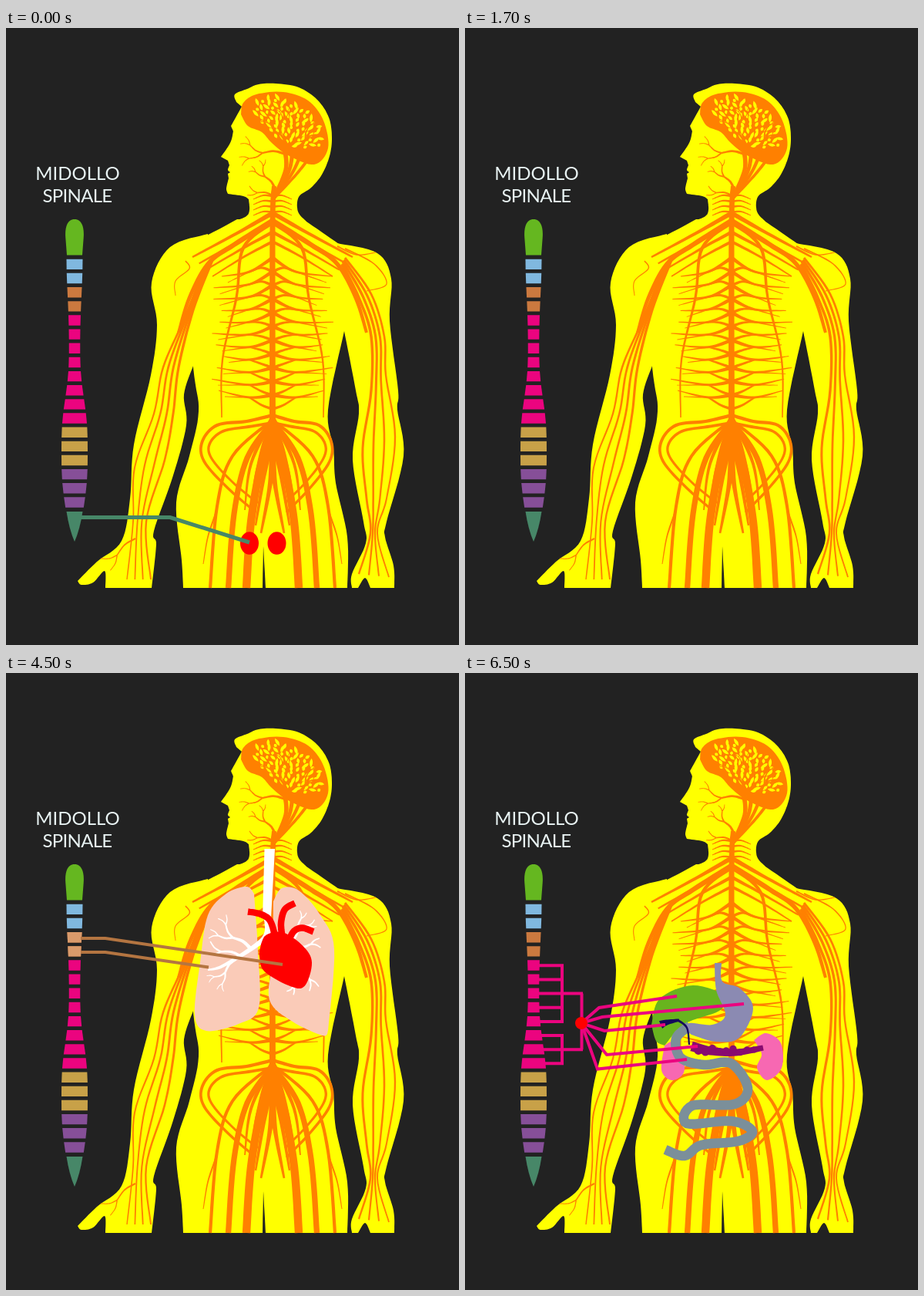
Write an HTML page that moves like this. It is 588 by 800 pixels and loops after 8000 ms.

```html
<!DOCTYPE html>
<html lang="it">
<head>
<meta charset="utf-8">
<title>Midollo spinale</title>
<style>
html, body { margin: 0; width: 100%; height: 100%; overflow: hidden; background: #222; }
svg { display: block; width: 100vw; height: 100vh; }
text { font: 400 24px Lato, "Open Sans", sans-serif; fill: #e8f3f3; text-anchor: middle; }
</style>
</head>
<body>
<svg id="stage" viewBox="0 0 588 800">
  <defs>
    <filter id="glow" x="-20%" y="-20%" width="140%" height="140%">
      <feGaussianBlur stdDeviation="1.8" result="b"/>
      <feMerge><feMergeNode in="b"/><feMergeNode in="SourceGraphic"/></feMerge>
    </filter>
  </defs>
</svg>
<script>
const stage = document.getElementById('stage');
const YELLOW = '#ffff00', ORANGE = '#ff8000', RED = '#ff0000', PINK = '#eb047f';
const LOOP = 8000, FIRST = 500, STEP = 2000, MID = 346;

function add(parent, tag, attrs, text) {
  const el = document.createElementNS('http://www.w3.org/2000/svg', tag);
  for (const k in attrs) el.setAttribute(k, attrs[k]);
  if (text) el.textContent = text;
  parent.appendChild(el);
  return el;
}
const group = (parent = stage, attrs = {}) => add(parent, 'g', attrs);
const parse = s => s.split(' ').map(p => p.split(',').map(Number));
const mirror = (s, k) => parse(s).map(([x, y]) => [MID + k * x, y]);
const mix = (a, b, t) => a + (b - a) * t;
const pathOf = pts => 'M' + pts.map(p => p.map(v => v.toFixed(1)).join()).join('L');

// Catmull-Rom samples through the given points
function sample(pts, steps = 8) {
  const out = [pts[0]];
  for (let i = 0; i < pts.length - 1; i++) {
    const a = pts[i - 1] || pts[i], b = pts[i], c = pts[i + 1], d = pts[i + 2] || c;
    for (let k = 1; k <= steps; k++) {
      const t = k / steps;
      out.push([0, 1].map(j => b[j] + 0.5 * t * (c[j] - a[j]
        + t * (2 * a[j] - 5 * b[j] + 4 * c[j] - d[j] + t * (3 * (b[j] - c[j]) + d[j] - a[j])))));
    }
  }
  return out;
}

// Closed shape; "|" marks a sharp corner
function shape(parent, fill, s) {
  let last = null, out = [];
  for (const part of s.split('|')) {
    const pts = parse(part);
    if (last) pts.unshift(last);
    last = pts[pts.length - 1];
    out = out.concat(sample(pts));
  }
  add(parent, 'path', { d: pathOf(out) + 'Z', fill });
}

// Strand whose width runs from w0 to w1
function strand(parent, fill, pts, w0, w1) {
  const line = sample(pts), n = line.length - 1, left = [], right = [];
  line.forEach(([x, y], i) => {
    const p = line[Math.max(0, i - 1)], q = line[Math.min(n, i + 1)];
    const dx = q[0] - p[0], dy = q[1] - p[1], h = mix(w0, w1, i / n) / 2 / (Math.hypot(dx, dy) || 1);
    left.push([x - dy * h, y + dx * h]);
    right.unshift([x + dy * h, y - dx * h]);
  });
  add(parent, 'path', { d: pathOf(left.concat(right)) + 'Z', fill });
}

// n nerves spread evenly between two guide lines
function bundle(parent, a, b, n, wa, wb, taper) {
  for (let i = 0; i < n; i++) {
    const t = i / (n - 1), w = mix(wa, wb, t);
    strand(parent, ORANGE, a.map((p, k) => p.map((v, j) => mix(v, b[k][j], t))), w, w * taper);
  }
}

// Branching tree; angle in degrees
function tree(parent, fill, x, y, angle, len, w, depth, bend = 12) {
  const at = (r, turn) => [x + r * Math.cos((angle + turn) * Math.PI / 180), y + r * Math.sin((angle + turn) * Math.PI / 180)];
  const end = at(len, 0);
  strand(parent, fill, [[x, y], at(len / 2, bend), end], w, w * 0.6);
  if (!depth) return;
  for (const turn of [-24, 30]) tree(parent, fill, ...end, angle + turn, len * 0.68, w * 0.6, depth - 1, -bend);
}

function tube(parent, stroke, width, s, cap = 'butt') {
  add(parent, 'path', {
    d: pathOf(sample(parse(s))), fill: 'none', stroke, 'stroke-width': width, 'stroke-linecap': cap
  });
}
const wire = (parent, stroke, points, width = 4) =>
  add(parent, 'polyline', { points, fill: 'none', stroke, 'stroke-width': width });

function drawBody() {
  const g = group();
  shape(g, YELLOW, '299,96 297,86 313,79 328,73 350,72 380,77 404,93 419,116 423,142 420,166 410,190 396,207 380,219 379,238 390,251|346,275|298,250|312,244 316,236 315,222|308,218 288,215|286,208 289,195|288,189|291,187|288,184 290,178|288,172|279,167|291,149 295,134|292,127|306,102|299,96');
  shape(g, YELLOW, '300,248 258,270 228,280|243,440 250,497 238,555 221,615 228,690 230,726|333,726|334,672|337,726|443,726|443,660 428,590 425,545 418,495 439,393|460,300|432,280 390,251');
  shape(g, YELLOW, '262,267 213,284 189,330 196,385 188,450 166,540 161,610 150,665 118,692 93,717|98,722 113,719 128,704 129,726|189,726|195,670 192,652 217,580 234,515 231,475 243,438|262,350');
  shape(g, YELLOW, '430,279 482,292 500,325 498,380 509,470 508,495 516,555 494,640 492,660 503,697 504,726|473,726|466,713 457,726|449,726|449,708 467,668 464,640 450,560 458,500 454,470 439,393|420,330');
}

function drawHead(g) {
  shape(g, ORANGE, '305,112 308,97 325,86 360,83 392,94 412,120 418,156 400,177 366,165 345,149 332,135 314,127 305,112');
  const count = 80;
  for (let i = 0; i < count; i++) {
    const r = Math.sqrt((i + 0.5) / count), a = i * 2.4;
    const u = 51 * r * Math.cos(a), v = 25 * r * Math.sin(a);
    const x = 367 + 0.85 * u - 0.53 * v, y = 122 + 0.53 * u + 0.85 * v;
    const aim = Math.atan2(y - 158, x - 366) * 180 / Math.PI + 30 * Math.sin(i * 5.1);
    const l = 4.2 + 1.8 * Math.sin(i * 3.7);
    add(g, 'path', {
      d: `M${-l},0Q0,-4 ${l},0Q0,4 ${-l},0Z`, fill: YELLOW,
      transform: `translate(${x.toFixed(1)} ${y.toFixed(1)}) rotate(${aim.toFixed(0)})`
    });
  }
  tree(g, ORANGE, 366, 162, -112, 26, 4, 3);
  tree(g, ORANGE, 372, 164, -50, 26, 4, 2);
  bundle(g, parse('362,158 363,184 347,222'), parse('391,172 374,193 347,222'), 4, 6, 4, 0.8);
  tree(g, ORANGE, 361, 163, 182, 28, 3.5, 2);
  tree(g, ORANGE, 349, 208, -130, 20, 3.5, 2);
  tree(g, ORANGE, 346, 217, 190, 20, 2.5, 1);
  for (const k of [-1, 1]) {
    for (let y = 218; y < 240; y += 7) strand(g, ORANGE, mirror(`0,${y} 12,${y - 1} 25,${y + 4}`, k), 3, 1);
  }
}

function drawTrunk(g) {
  strand(g, ORANGE, parse('348,205 346,260 346,515'), 6, 8);
  for (const k of [-1, 1]) {
    bundle(g, mirror('0,240 46,266 104,297', k), mirror('0,277 36,296 78,322', k), 4, 6, 4, 0.4);
    strand(g, ORANGE, mirror('0,250 50,281 84,306 108,350 122,395', k), 7, 4);
    strand(g, ORANGE, mirror('0,252 38,285 47,350 65,430 66,505', k), 5, 1.6);
    for (let i = 0; i < 11; i++) {
      const y = 298 + i * 17.8, drop = 24 - i * 3, far = 72 + 7 * Math.sin(i * 1.7 + k);
      const fork = `30,${y + 6 + drop / 2}`;
      strand(g, ORANGE, mirror(`0,${y} ${fork} ${far},${y + drop}`, k), 5, 1);
      strand(g, ORANGE, mirror(`0,${y + 18} 14,${y + 13} ${fork}`, k), 4, 2);
      strand(g, ORANGE, mirror(`${fork} ${far - 8},${y + drop + 8}`, k), 2, 0.8);
    }
  }
}

function drawArms(g) {
  bundle(g, parse('258,310 230,380 204,440 192,500 167,570 165,640 157,715'),
    parse('268,300 243,365 224,440 217,500 206,560 182,640 188,715'), 4, 3, 4, 0.5);
  bundle(g, parse('436,306 458,350 474,400 474,470 463,545 468,610 473,655 458,708'),
    parse('440,298 474,345 491,400 493,450 505,530 494,610 482,655 497,712'), 4, 4, 3, 0.6);
  tree(g, ORANGE, 168, 662, 138, 32, 2.4, 1);
  strand(g, ORANGE, parse('233,302 238,312 220,328 220,347'), 1.6, 1);
  strand(g, ORANGE, parse('440,286 478,306 494,332 468,341'), 2, 1);
  strand(g, ORANGE, parse('430,283 455,294 480,291'), 2, 1);
}

function drawPelvis(g) {
  for (const k of [-1, 1]) {
    const hip = k < 0 ? -1.2 : 1;
    bundle(g, mirror('0,502 28,510 60,515 76,536 74,562 48,597 18,628', hip),
      mirror('0,512 26,517 54,523 68,539 66,558 44,588 16,616', hip), 2, 4.5, 4, 0.7);
    bundle(g, mirror('0,508 52,555 72,620 81,726', k), mirror('0,512 14,560 28,640 34,726', k), 3, 4, 10, 1.05);
    bundle(g, mirror('0,505 28,565 36,625', k), mirror('0,540 3,590 15,655', k), 4, 6, 9, 0.3);
    strand(g, ORANGE, mirror('74,630 84,660 90,695', k), 2.5, 1);
  }
}

const colours = [['#80b8df', 2], ['#cb793f', 2], [PINK, 8], ['#c8a148', 3], ['#864f98', 3]]
  .flatMap(([c, n]) => Array(n).fill(c));
const cordY = i => 299.7 + 18.15 * i;
// Half width: slim neck above, rounded swelling below
const cordWidth = i => 7 + 3.5 * Math.exp(-((i / 3.5) ** 2)) + 10 * Math.exp(-(Math.abs((i - 13.8) / 4.4) ** 3));

function block(parent, i, fill) {
  const y = cordY(i), a = cordWidth(i), b = cordWidth(i + 0.75);
  add(parent, 'path', { d: `M${89 - a},${y}H${89 + a}L${89 + b},${y + 13.4}H${89 - b}Z`, fill });
}
function drawCord() {
  const g = group();
  add(g, 'path', { d: 'M79,294.5L77.3,272C76,256 81,248 89,248S102,256 100.7,272L99,294.5Z', fill: '#65b720' });
  colours.forEach((c, i) => block(g, i, c));
  add(g, 'path', { d: 'M78.5,627H99.5Q96,650 89,666Q82,650 78.5,627Z', fill: '#478768' });
  add(g, 'text', { x: 93, y: 197 }, 'MIDOLLO');
  add(g, 'text', { x: 92.5, y: 226, 'letter-spacing': -0.7 }, 'SPINALE');
}

function heart(parent, dy, cap) {
  const g = group(parent, { transform: `translate(0 ${dy})` });
  shape(g, RED, '331,349 338,337 360,334 386,352 397,373 388,403 370,404 336,385 329,365 331,349');
  for (const s of ['314,307 330,310 343,319 350,342', '359,342 357,322 362,304 375,296', '367,344 374,332 385,328 399,333'])
    tube(g, RED, 8.5, s, cap);
}

function glands() {
  const g = group();
  for (const cx of [316, 351.5]) add(g, 'ellipse', { cx, cy: 668, rx: 12, ry: 14.8, fill: RED });
  wire(g, '#478768', '97,634.5 213,634.5 316,667', 5);
  return g;
}

function heartScene() {
  const g = group(), lit = '#6aa3d0';
  heart(group(g, { filter: 'url(#glow)' }), 0, 'round');
  const h = group(g, { filter: 'url(#glow)' });
  for (const i of [0, 1]) block(h, i, '#a0cdeb');
  wire(h, lit, '99,306 127.5,306 127.5,324 99,324');
  wire(h, lit, '127.5,314.5 190,327.5');
  wire(g, '#78b4cc', '188,327 357,362');
  return g;
}

function lungScene() {
  const g = group(), flesh = '#facbb8', white = '#fff';
  shape(g, flesh, '322,286 312,277 286,286 262,314 252,375 245,443 260,464 302,455 328,434 327,360 322,286');
  shape(g, flesh, '347,296 358,279 380,282 408,314 426,358 418,464|411,470 372,452 342,424 346,370 347,296');
  shape(g, white, '335.5,228|349,228|344,318|333,318');
  strand(g, white, parse('339,312 339,338 322,355 281,380 262,385'), 10, 2);
  tree(g, white, 318, 358, 212, 28, 5, 2);
  tree(g, white, 306, 368, 194, 28, 4, 1);
  tree(g, white, 298, 371, 128, 22, 4, 2);
  tree(g, white, 366, 350, -52, 22, 5, 2);
  tree(g, white, 376, 355, -10, 20, 4, 1);
  tree(g, white, 384, 378, 62, 22, 4, 1);
  tree(g, white, 380, 392, 115, 16, 4, 1);
  heart(g, 2.5, 'butt');
  for (const i of [2, 3]) block(g, i, '#d99a6b');
  wire(g, '#b47541', '97,344 129,344 359,378');
  wire(g, '#b47541', '97,362 129,362 263,381.5');
  return g;
}

function gutScene() {
  const g = group(), kidney = '#f768b2', navy = '#14095c', plum = '#880b70';
  shape(g, kidney, '259,483 255,515 268,528 284,518 282,490 270,478 259,483');
  shape(g, kidney, '375,476 391,467 410,480 411,512 392,528 379,512 385,494 375,476');
  shape(g, '#68b41e', '242,456 253,422 296,405 343,418|330,438 285,455 259,483|248,477 242,456');
  tube(g, '#7b8f9a', 12.5, '292,457 274,474 280,499 310,508 345,506 367,538 350,559 295,561 288,584 346,581 373,594 355,607 307,612 285,626 260,618');
  shape(g, '#8b8ab2', '324,376|333,376|334,400 357,409 374,435 356,473 325,478 294,469|287,464|291,454 321,456 338,443 326,411 324,376');
  strand(g, navy, parse('254,456 262,453 278,450'), 11, 3);
  strand(g, navy, parse('276,450 288,460 291,482'), 3, 2);
  strand(g, plum, parse('294,484 319,490 352,492 387,486'), 13, 7);
  for (let i = 0; i < 9; i++) {
    add(g, 'circle', { cx: 303 + i * 9, cy: 489.5 + 2.5 * Math.sin(i * 2.3), r: 5.4 - i * 0.15, fill: plum });
  }
  const level = i => cordY(i) + 7;
  for (let i = 4; i < 12; i++) wire(g, PINK, `95,${level(i)} ${i === 6 || i === 10 ? 153 : 128},${level(i)}`);
  for (const [x, a, b] of [[126, 4, 8], [126, 9, 11], [151.5, 6, 10]]) wire(g, PINK, `${x},${level(a)} ${x},${level(b)}`);
  for (const s of ['174,434 275,419', '178,446 362,429', '181,464 260,456', '184,495 302,484', '172,513.5 288,501'])
    wire(g, PINK, '151,454 ' + s);
  add(g, 'circle', { cx: 151, cy: 454, r: 8, fill: RED });
  return g;
}

drawBody();
const nerves = group();
for (const draw of [drawHead, drawTrunk, drawArms, drawPelvis]) draw(nerves);
drawCord();
const scenes = [glands(), group(), heartScene(), lungScene(), gutScene()];

const start = performance.now();
function frame() {
  const t = (performance.now() - start) % LOOP;
  const now = t < FIRST ? 0 : 1 + Math.floor((t - FIRST) / STEP);
  scenes.forEach((s, i) => s.setAttribute('display', i === now ? 'inline' : 'none'));
  requestAnimationFrame(frame);
}
frame();
</script>
</body>
</html>
```
